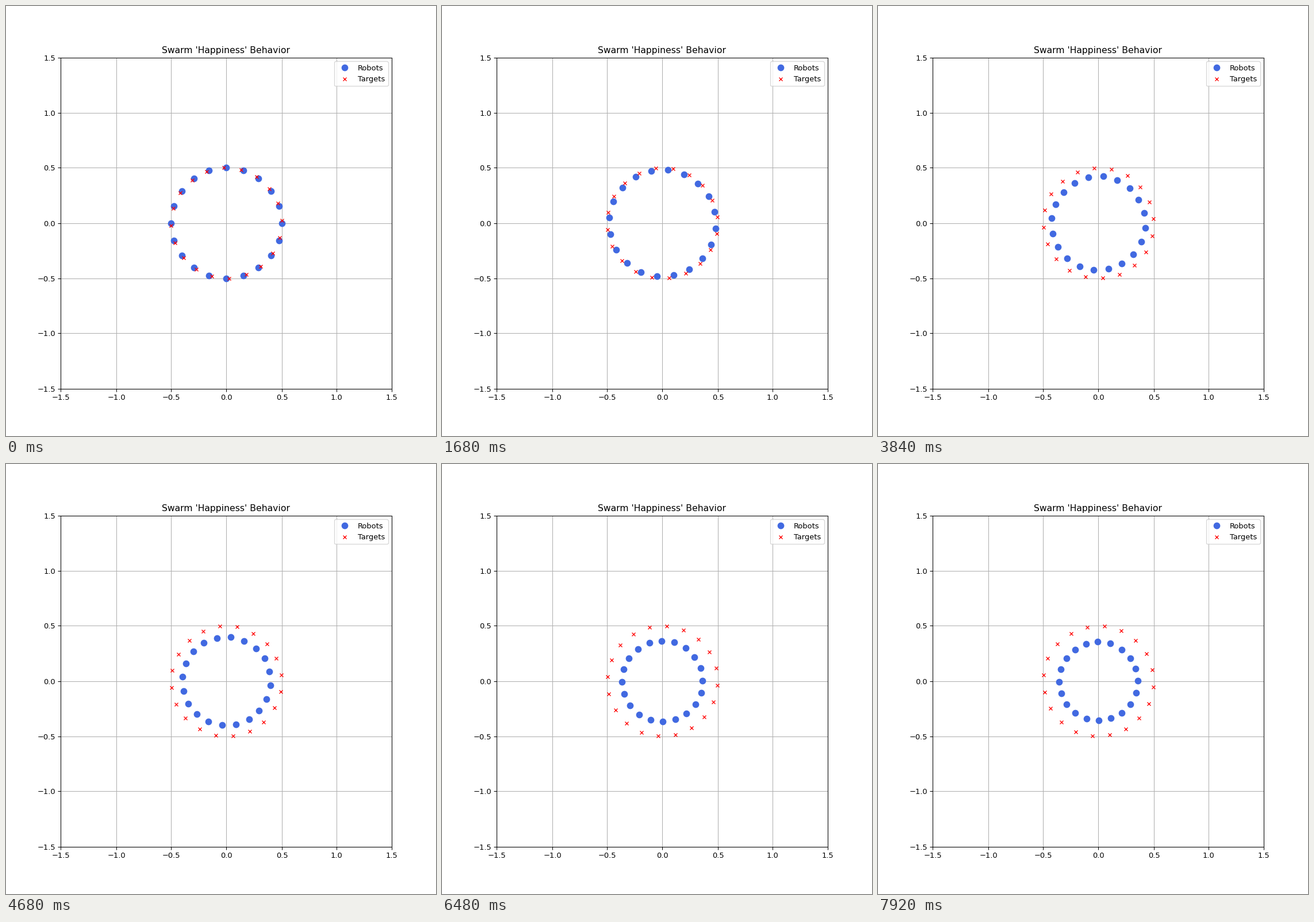
A matplotlib script that plays this animation: 748x748 px, repeating every 8000 ms.

```python
import numpy as np
import matplotlib.pyplot as plt
from matplotlib.animation import FuncAnimation

SIZE = 748           # stage, pixels
RASTER = 800         # finer raster on which positions are rounded first
CENTER = (410, 404)  # plot centre on that raster, y downwards
UNIT = 616 / 3       # raster pixels per plot unit

COUNT = 20
RADIUS = 0.5
SPIN = 0.05          # target rotation per step, radians
GAIN = 0.05          # share of the gap a robot closes per step
TICK = 40            # ms per drawn frame
HOLD = 3             # drawn frames per step
FRAMES = 200
STEPS = (FRAMES + HOLD - 1) // HOLD


def stage_px(raster_pos):
    """Round to a raster cell, then give the stage pixel that shows it."""
    cell = np.floor(raster_pos + 0.5)
    return np.ceil(cell * SIZE / RASTER - 0.5)


def col(x):
    return stage_px(CENTER[0] + UNIT * x)


def row(y):
    return stage_px(CENTER[1] - UNIT * y)


start = RADIUS * np.exp(2j * np.pi * np.arange(COUNT) / COUNT)


def targets_at(step):
    return start * np.exp(1j * SPIN * (step + 1))


def chase():
    """Robot positions for every step, each one pursuing its target."""
    path = [start]
    for step in range(STEPS - 1):
        path.append(path[-1] + GAIN * (targets_at(step) - path[-1]))
    return path


robot_path = chase()

ticks = np.arange(-3, 4) / 2
labels = [f"{v:.1f}".replace("-", "\u2212") for v in ticks]
xs, ys = col(ticks), row(ticks)
left, right, bottom, top = xs[0], xs[-1], ys[0], ys[-1]

# The axes count in stage pixels, so every mark lands on a whole pixel.
fig = plt.figure(figsize=(8, 8), dpi=SIZE / 8)
ax = fig.add_axes([left / SIZE, 1 - bottom / SIZE,
                   (right - left) / SIZE, (bottom - top) / SIZE])
ax.set_xlim(left, right)
ax.set_ylim(bottom, top)
ax.set_xticks(xs, labels)
ax.set_yticks(ys, labels)
ax.grid(True)
ax.set_title("Swarm 'Happiness' Behavior")

robots, = ax.plot([], [], "o", color="royalblue", markersize=8, label="Robots")
targets, = ax.plot([], [], "x", color="red", markersize=4, label="Targets")
ax.legend(loc="upper right")


def update(frame):
    step = frame // HOLD
    for line, points in ((robots, robot_path[step]), (targets, targets_at(step))):
        line.set_data(col(points.real), row(points.imag))
    return robots, targets


anim = FuncAnimation(fig, update, frames=FRAMES, interval=TICK,
                     repeat=True, repeat_delay=0)
plt.show()
```
